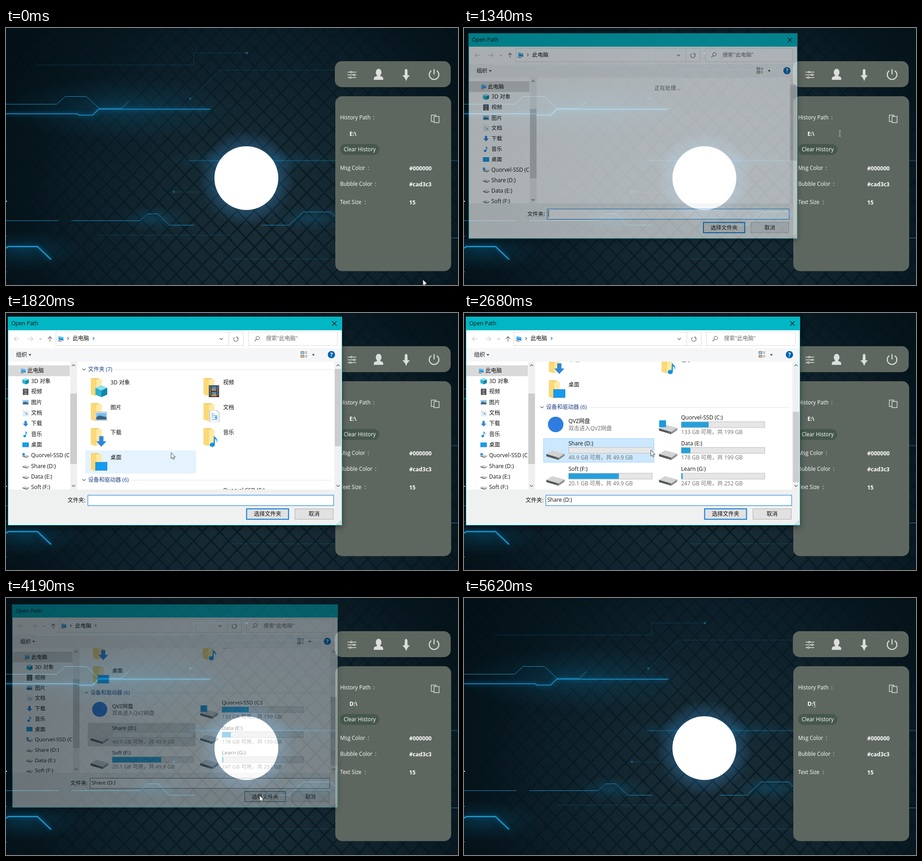
Write an HTML page that moves like this. It is 991 px wide and 565 px high and loops after 5.7 s.

```html
<!DOCTYPE html>
<html lang="zh-CN">
<head>
<meta charset="utf-8">
<title>Open Path</title>
<style>
html, body { margin: 0; width: 100%; height: 100%; overflow: hidden; background: #04121a; }
svg { display: block; }
#stage { width: 991px; height: 565px; }
text { font: 12px "Open Sans", "Noto Sans CJK SC", "Noto Sans CJK", sans-serif; fill: #111; white-space: pre; }
.panel text { fill: #fff; font-size: 11.7px; }
.panel .bold { font-weight: 700; font-size: 12.1px; }
.dim { fill: #6d6d6d; }
.head { fill: #1e3f86; }
.mid { text-anchor: middle; }
.line { fill: none; stroke: #555; stroke-width: 1.1; }
.faint { fill: none; stroke: #12698c; stroke-opacity: .4; }
.wire { fill: none; stroke: #1f8fc4; stroke-width: 1; }
.glow { fill: none; stroke: #0c7fc0; stroke-width: 7; filter: url(#blur5); opacity: .3; }
</style>
</head>
<body>
<svg id="stage" viewBox="0 0 991 565"></svg>
<script>
const LOOP = 5700, STEP = 80;
const ROW = 23.3, SCROLL = 160;
const BLUE = '#0078d7';

// ---------- drawing helpers ----------
const text = (x, cy, s, cls = '', more = '') => `<text x="${x}" y="${Math.round(cy + 4)}" class="${cls}" ${more}>${s}</text>`;
const rect = (x, y, w, h, fill, more = '') => `<rect x="${x}" y="${y}" width="${w}" height="${h}" fill="${fill}" ${more}/>`;
const frame = (x, y, w, h, stroke, fill = 'none', more = '') => rect(x + .5, y + .5, w - 1, h - 1, fill, `stroke="${stroke}" ${more}`);
const path = (d, cls = 'line', more = '') => `<path d="${d}" class="${cls}" ${more}/>`;
const use = (id, x, y, w, h = w) => `<use href="#${id}" x="${x}" y="${y}" width="${w}" height="${h}"/>`;
const chevron = (x, y, turn = 0, size = 3.5, more = '') =>
  path(`M${-size} ${-size / 2}L0 ${size / 2}L${size} ${-size / 2}`, 'line', `transform="translate(${x} ${y}) rotate(${turn})" ${more}`);
const triangle = (x, y) => `<path d="M${x - 3} ${y - 1.5}h6l-3 3.5z" fill="#333"/>`;
const radial = (id, color, alpha) =>
  `<radialGradient id="${id}"><stop stop-color="${color}" stop-opacity="${alpha}"/><stop offset=".5" stop-color="${color}" stop-opacity="${alpha * .4}"/><stop offset="1" stop-color="${color}" stop-opacity="0"/></radialGradient>`;
const halo = (id, x, y, rx, ry) => `<ellipse cx="${x}" cy="${y}" rx="${rx}" ry="${ry}" fill="url(#${id})"/>`;
const symbol = (id, w, h, body) => `<symbol id="${id}" viewBox="0 0 ${w} ${h}">${body}</symbol>`;

const defs = `<defs>
  <filter id="blur5" filterUnits="userSpaceOnUse" x="0" y="0" width="991" height="565"><feGaussianBlur stdDeviation="5"/></filter>
  <filter id="blur7" x="-10%" y="-10%" width="120%" height="120%"><feGaussianBlur stdDeviation="7"/></filter>
  <radialGradient id="base" gradientUnits="userSpaceOnUse" cx="540" cy="370" r="600">
    <stop stop-color="#142a34"/><stop offset=".5" stop-color="#091c26"/><stop offset="1" stop-color="#030f16"/></radialGradient>
  <radialGradient id="fade" gradientUnits="userSpaceOnUse" cx="560" cy="430" r="500">
    <stop stop-color="#fff"/><stop offset=".5" stop-color="#808080"/><stop offset="1" stop-color="#141414"/></radialGradient>
  ${radial('teal', '#0a6f9c', .3)}${radial('sky', '#3f9be8', 1)}
  <pattern id="mesh" width="3" height="3" patternUnits="userSpaceOnUse">${rect(0, 0, 1, 1, '#06141b')}</pattern>
  <pattern id="grid" width="27" height="27" patternUnits="userSpaceOnUse" patternTransform="translate(526 300) scale(1 1.04) rotate(45)">
    ${rect(0, 0, 27, 27, '#1b2e37')}${rect(0, 0, 27, 3.5, '#091a22')}${rect(0, 0, 3.5, 27, '#091a22')}</pattern>
  <mask id="gridMask">${rect(0, 0, 991, 565, 'url(#fade)')}</mask>
  <clipPath id="sideClip">${rect(5, 107, 135, 281)}</clipPath>
  <clipPath id="listClip">${rect(156, 107, 564, 281)}</clipPath>
  ${symbol('pc', 14, 14, '<path d="M2 2l10 2v7L2 9z" fill="#1f8fdc"/><path d="M2 2l10 2v3L2 6z" fill="#5cc0f5"/><path d="M1 10l8 2-2 1-6-1z" fill="#777"/>')}
  ${symbol('cube', 14, 14, '<path d="M7 0l7 3-7 3-7-3z" fill="#8be0ee"/><path d="M0 3l7 3v8l-7-3z" fill="#27b3cf"/><path d="M14 3L7 6v8l7-3z" fill="#1186a8"/>')}
  ${symbol('film', 14, 14, '<path d="M1 0h12v14H1z" fill="#333"/><path d="M4 1h6v5.5H4zM4 7.5h6V13H4z" fill="#3f83c9"/><path d="M4 5l3-2 3 3v.5H4zM4 12l4-3 2 2v2H4z" fill="#c78a45"/><path d="M2.5 1v12M11.5 1v12" stroke="#ddd" stroke-dasharray="1 1"/>')}
  ${symbol('picture', 14, 14, '<path d="M0 2h14v10H0z" fill="#eef3f7" stroke="#9aa" stroke-width=".5"/><path d="M1 3h12v8H1z" fill="#79bdec"/><path d="M1 8l4-2 8 2v3H1z" fill="#3a637f"/>')}
  ${symbol('doc', 14, 14, '<path d="M2 0h8l3 3v11H2z" fill="#fff" stroke="#9ab" stroke-width=".6"/><path d="M4 4h3M4 6h7M4 8h3M4 11h7" stroke="#4b93cc" stroke-width=".7"/><path d="M8 7h3v3H8z" fill="#5ea9dd"/>')}
  ${symbol('down', 14, 14, '<path d="M4.5 1h5v6H13l-6 6.500L1 7h3.500z" fill="#2f86dc"/>')}
  ${symbol('note', 14, 14, '<path d="M7 0c1 3 6 4 3 9 1-4-1-4-2-4.500V11a3 2.500 0 1 1-1.500-2z" fill="#1191e8"/>')}
  ${symbol('screen', 14, 14, '<path d="M0 2h14v10H0z" fill="#0f78c8"/><path d="M.5 2.500h13v9H.5z" fill="#159cf0"/>')}
  ${symbol('drive', 40, 22, '<path d="M0 9L13 1l27 7-13 9z" fill="#d2d3d4"/><path d="M0 9l27 8v5L0 14z" fill="#55585a"/><path d="M27 17l13-9v5l-13 9z" fill="#8d9092"/><path d="M21 17l3 1v1l-3-1z" fill="#6f6"/>')}
  ${symbol('folder', 26, 42, '<path d="M1 1h17l2 4h5v34H6z" fill="#f5cf68"/><path d="M12 4h13v35H12z" fill="#ffe9a6"/><path d="M1 1l12 5v35L1 37z" fill="#fbd978"/>')}
</defs>`;

// ---------- wallpaper ----------
const thin = ['M0 167.500H111L130 150.500H176L204 176.500H253L269 161', 'M0 423.500H115M143 423.500H294L310 408.500H333L359 433.500H413', 'M561 433.500H620L652 404.500H712L722 414M977 461.500H991'];
const beamLine = 'M0 188.500H156L160 191.500H190L203 178.500H448', cornerLine = 'M0 484L5 480.500H69L99 509';
const dot = (x, y) => `<circle cx="${x}" cy="${y}" r="2.5" fill="#125f80"/>`;
const wallpaper = `
  ${rect(0, 0, 991, 565, 'url(#base)')}
  <g mask="url(#gridMask)">${rect(0, 0, 991, 565, 'url(#grid)')}</g>
  ${rect(0, 0, 991, 565, 'url(#mesh)', 'opacity=".35"')}
  ${halo('teal', 250, 178, 260, 70)}${halo('teal', 40, 490, 130, 45)}${halo('teal', 540, 291, 200, 25)}
  ${halo('teal', 325, 420, 80, 28)}${halo('teal', 670, 418, 90, 28)}
  ${path('M67 81.500H411.500V55H528M404 155L470 92.500H722M368 360.500H434L450 345M205 455.500H500M490 507.500H722', 'faint')}
  ${dot(528, 55)}${dot(404, 155)}${dot(368, 360)}
  ${path('M400 291.500H722M976 291.500H991', 'wire', 'opacity=".35" style="stroke-width:2"')}
  ${[beamLine, cornerLine].map(d => path(d, 'glow')).join('')}
  ${thin.map(d => path(d, 'wire')).join('')}
  ${path(beamLine, 'wire', 'style="stroke-width:1.6;stroke:#1ca0de"')}
  ${path(cornerLine, 'wire', 'style="stroke-width:3"')}
  ${rect(0, 380, 2, 2, '#fff')}${rect(0, 457, 1, 2, '#9ab')}${rect(0, 535, 1, 2, '#9ab')}
  ${halo('sky', 527, 330, 105, 105)}
  <circle cx="527" cy="330" r="70" fill="#fff"/>`;

// ---------- settings panel ----------
const labels = [['History Path', 197, 805], ['Msg Color', 308, 793], ['Bubble Color', 343, 809], ['Text Size', 383, 786]];
const panel = `<g class="panel">
  ${rect(721, 73, 254, 57, '#5e675f', 'rx="15"')}${rect(722, 150, 254, 384.5, '#5e675f', 'rx="15"')}
  <g fill="none" stroke="#dcdfdc" stroke-width="1.400">
    <path d="M749 97H768M749 103H768M749 109H768"/>
    <g fill="#5e675f"><circle cx="757" cy="97" r="1.800"/><circle cx="763" cy="103" r="1.800"/><circle cx="755" cy="109" r="1.800"/></g>
    <path d="M932.500 191.500h10v14h-10z"/><path d="M938.500 194.500h11v13.500h-11z" fill="#5e675f"/>
    <path d="M932.500 94a10.500 10.500 0 1 0 12 0M938.500 90.500V102" stroke-width="2.300"/>
  </g>
  <g fill="#dcdfdc"><ellipse cx="817" cy="97.500" rx="6.300" ry="7.700"/><path d="M813.500 102h7v3.500l5 2q1.800 1.500 1.500 6.500h-20.500q-.3-5 1.500-6.500l5.500-2z"/>
    <path d="M874.500 92q2.700-4 5.500 0l.5 12h5l-5.500 6-2.500 6.500-3-6.500-5.500-6h5z"/></g>
  ${labels.map(([s, y, colon]) => text(732.5, y, s) + text(colon, y, ':')).join('')}
  <text id="drivePath" x="753" y="237" class="bold"></text>
  ${rect(732.5, 255, 86, 24, '#46584b', 'rx="12"')}${text(775.5, 267, 'Clear History', 'mid')}
  ${text(884, 308.5, '#000000', 'bold')}${text(884, 343.5, '#cad3c3', 'bold')}${text(884, 383.5, '15', 'bold')}
</g>`;

// ---------- dialog ----------
const places = [['3D 对象', 'cube'], ['视频', 'film'], ['图片', 'picture'], ['文档', 'doc'], ['下载', 'down'], ['音乐', 'note'], ['桌面', 'screen']];
const drives = [['Quorvel-SSD (C:)', '133 GB 可用，共 199 GB', 60], ['Share (D:)', '49.9 GB 可用，共 49.9 GB', 0], ['Data (E:)', '178 GB 可用，共 199 GB', 20],
  ['Soft (F:)', '20.1 GB 可用，共 49.9 GB', 110], ['Learn (G:)', '247 GB 可用，共 252 GB', 3]];

const sidebar = `<g clip-path="url(#sideClip)">
  ${rect(5, 115, 135, 24, '#d9d9d9')}${use('pc', 31, 120, 14)}${text(47, 127, '此电脑')}
  ${places.map(([s, icon], i) => use(icon, 36, 143 + i * ROW, 14) + text(55, 150 + i * ROW, s)).join('')}
  ${drives.slice(0, 4).map(([s], i) => use('drive', 36, 310.5 + i * ROW, 15, 8) + text(55, 313.4 + i * ROW, s)).join('')}
  ${rect(36, 308, 5, 5, '#1a9be0')}</g>
  ${rect(141, 107, 15, 281, '#f0f0f0')}${rect(141, 177, 14.5, 155, '#cdcdcd')}${chevron(148, 115, 180)}${chevron(148, 380)}`;

const section = (y, s, ruleX) => chevron(171, y) + text(180, y, s, 'head') + rect(ruleX, y, 714 - ruleX, 1, '#e4e4e4');
const placeTile = ([s, icon], i) => {
  const x = i % 2 ? 421 : 174, y = 137 + 55 * (i >> 1);
  return use('folder', x + 11, y + 5, 26, 42) + use(icon, x + 22, y + 22, 26) + text(x + 55, y + 16, s);
};
const driveTile = ([s, space, used], i) => {
  const x = i % 2 ? 174 : 421, y = 379.5 + 56.6 * ((i + 1) >> 1);
  return use('drive', x + 6, y + 25, 41, 22) + text(x + 55, y + 10.5, s) + frame(x + 55, y + 19, 184, 14, '#bcbcbc', '#e6e6e6')
    + rect(x + 55.5, y + 20, used, 12, '#26a0da') + text(x + 55, y + 42, space, 'dim');
};
const list = `<g clip-path="url(#listClip)"><g id="list">
  ${rect(174, 302, 243, 51, '#e5f3ff', 'id="hoverDesk"')}
  ${frame(174, 435.5, 243, 53, '#99d1ff', '#cce8ff', 'id="share"')}
  ${section(124, '文件夹 (7)', 239)}${places.map(placeTile).join('')}
  ${section(367, '设备和驱动器 (6)', 274)}
  <circle cx="201" cy="405" r="17" fill="#2f7de0"/>${text(229, 397.5, 'QVZ网盘')}${text(229, 413.5, '双击进入QVZ网盘', 'dim')}
  ${drives.map(driveTile).join('')}${rect(428, 396, 15, 15, '#1a9be0')}</g></g>`;

const dialog = `<g id="dialog">
  ${rect(4, 12, 733, 459, '#000', 'filter="url(#blur7)" opacity=".45"')}
  ${frame(4, 8, 733, 459, '#00b7c3', '#eff1f1')}${rect(4, 8, 733, 30, '#00b7c3')}
  ${text(11.5, 23, 'Open Path')}${path('M715 18l10 10M725 18l-10 10', 'line', 'id="close" style="stroke:#111"')}
  ${rect(5, 38, 731, 39, '#fff')}${rect(5, 77, 731, 30, '#f5f6f7')}${rect(5, 107, 731, 281, '#fff')}
  ${path('M30 57H18m5-5l-5 5 5 5M47 57h12m-5-5l5 5-5 5', 'line', 'style="stroke:#c6c6c6"')}${chevron(76, 57, 0, 2.5, 'opacity=".5"')}
  ${path('M96.500 63V52m-4.500 4.500l4.500-4.500 4.500 4.500')}
  ${frame(109, 41, 412, 31, '#d9d9d9', '#fff')}${rect(488, 42, 1, 29, '#d9d9d9')}${use('pc', 113, 49, 15)}
  ${chevron(136, 56, -90, 3)}${text(146, 56, '此电脑')}${chevron(472, 57)}
  ${path('M501 53.500a5 5 0 1 0 6 0M508 57v-4h-4')}
  ${frame(531, 41, 196, 31, '#d9d9d9', '#fff')}<circle cx="552" cy="55" r="3.800" class="line"/>${path('M549 58l-4 4')}${text(570, 56, '搜索"此电脑"', 'dim')}
  ${text(22, 92, '组织')}${triangle(52.5, 92)}${triangle(674, 92)}
  ${frame(646, 84, 8, 6, '#777', '#9cc4e0')}${frame(646, 92, 8, 6, '#777', '#d6b48a')}${path('M656 85.500h4m-4 3h4m-4 5h4m-4 3h4')}
  <circle cx="713.500" cy="91.500" r="8" fill="#0063b1"/>${text(713.5, 91.5, '?', 'mid', 'style="fill:#fff;font-weight:700"')}
  ${sidebar}
  ${rect(720, 107, 15, 281, '#f0f0f0')}<rect id="thumb" x="721" width="14" fill="#cdcdcd"/>
  ${text(447, 130, '正在处理...', 'mid dim', 'id="loading"')}
  <g id="loaded">${chevron(192, 56, -90, 3, 'style="stroke:#06a"')}${chevron(728, 115, 180)}${chevron(728, 380)}${list}</g>
  ${text(135, 412, '文件夹:')}${frame(179, 400, 540, 24, BLUE, '#fff', 'id="input"')}
  ${rect(182, 403, 1, 15, '#000', 'id="caret"')}${text(182.5, 411, 'Share (D:)', '', 'id="typed"')}
  <rect id="choose" x="527.500" y="430.500" width="92" height="23"/>${text(573.5, 442, '选择文件夹', 'mid')}
  ${frame(633, 430, 85, 24, '#adadad', '#e1e1e1')}${text(675.5, 442, '取消', 'mid')}
  <path d="M733 457v8M729.500 460.500v5M726 464v2" stroke="#aaa" stroke-width="2" stroke-dasharray="2 1.500"/>
</g>`;

const pointer = `<g id="pointer">
  <path id="arrow" d="M0 0V13.200L3 10.500L5 15L7.200 14L5.200 9.700H9.500Z" fill="#fff" stroke="#111" stroke-width=".8"/>
  <path id="beam" d="M-2.500 -6H-.5L0 -5.500L.5 -6H2.500M0 -5.500V5.500M-2.500 6H-.5L0 5.500L.5 6H2.500" fill="none"/>
  <g id="busy" fill="none" stroke-width="3.200"><circle r="6.500" stroke="#1583e6"/><path d="M0 -6.500A6.500 6.500 0 0 1 6.500 0" stroke="#5cc8ff"/></g>
</g>`;

const stage = document.getElementById('stage');
stage.innerHTML = defs + wallpaper + panel + dialog + pointer;
const el = Object.fromEntries([...stage.querySelectorAll('[id]')].map(n => [n.id, n]));

// ---------- motion ----------
// Screen refreshes: [first time, count], STEP apart.
const bursts = [[0, 1], [70, 8], [710, 1], [860, 8], [1500, 5], [1980, 2], [2370, 1], [2520, 5], [2990, 8], [3630, 8], [4260, 8], [4900, 8], [5540, 2]];
const ticks = bursts.flatMap(([start, n]) => Array.from({ length: n }, (_, i) => start + i * STEP));

// Pointer stops: time, x, y.
const route = [[0, 914, 553], [70, 914, 546], [310, 922, 390], [550, 933, 225], [630, 935, 208], [710, 935, 205], [859, 935, 205], [860, 939, 201], [1180, 939, 201],
  [1260, 905, 212], [1340, 824, 232], [1420, 743, 246], [1580, 480, 288], [1740, 374, 306], [1820, 362, 307], [2520, 362, 307], [2840, 457, 296],
  [2990, 460, 302], [3230, 486, 372], [3390, 500, 411], [3550, 556, 437], [3630, 556, 434], [4260, 556, 434], [4420, 610, 390], [4660, 730, 275], [4820, 764, 243],
  [4980, 742, 236], [5140, 768, 231], [5300, 740, 234], [5460, 756, 231], [5620, 769, 234]];
const fadeKeys = [[1180, 0], [1260, .15], [1340, .66], [1420, .95], [1500, 1], [4030, 1], [4110, .85], [4190, .43], [4260, .1], [4340, 0]];
const zoomKeys = [[1260, .965], [1340, .984], [1420, .997], [1500, 1], [4030, 1], [4110, .991], [4190, .974], [4260, .962]];
const scrollKeys = [[1820, 0], [1980, .5], [2060, 1]];

function sample(keys, t, i = 1) {
  const next = keys.findIndex(k => k[0] > t);
  if (next < 0) return keys[keys.length - 1][i];
  if (next === 0) return keys[0][i];
  const a = keys[next - 1], b = keys[next];
  return a[i] + (b[i] - a[i]) * (t - a[0]) / (b[0] - a[0]);
}
const show = (node, on) => node.setAttribute('display', on ? 'inline' : 'none');
const set = (node, attrs) => Object.entries(attrs).forEach(([k, v]) => node.setAttribute(k, v));

function draw(t) {
  const x = sample(route, t, 1), y = sample(route, t, 2);
  const opacity = sample(fadeKeys, t), zoom = sample(zoomKeys, t), scroll = sample(scrollKeys, t);
  const closing = t >= 4110, loaded = t >= 1500, picked = t >= 2520, over = t >= 3550;

  show(el.dialog, opacity > 0);
  set(el.dialog, { opacity, transform: `translate(370.5 237.5) scale(${zoom}) translate(-370.5 -237.5)` });
  show(el.close, !closing);
  show(el.loading, !loaded);
  show(el.loaded, loaded);
  set(el.list, { transform: `translate(0 ${-SCROLL * scroll})` });
  set(el.thumb, { y: 123 + 94 * scroll, height: 170 - 15 * scroll });
  show(el.hoverDesk, t >= 1660 && t < 1980);
  show(el.share, t >= 2060);
  set(el.share, { fill: closing ? '#d9d9d9' : picked ? '#cce8ff' : '#e5f3ff', stroke: closing ? '#d9d9d9' : picked ? '#99d1ff' : '#e5f3ff' });
  show(el.typed, picked);
  show(el.caret, t < 1820 || (t >= 2370 && !picked));
  set(el.input, { stroke: t >= 2990 ? '#5c5c5c' : BLUE });
  set(el.choose, { fill: over && !closing ? '#e5f1fb' : '#e1e1e1', stroke: closing ? '#123c5c' : BLUE, 'stroke-width': over ? 1 : 2 });
  el.drivePath.textContent = t >= 4190 ? 'D:\\' : 'E:\\';

  const busy = t >= 860 && t <= 1180;
  const inField = x > 737 && y > 222 && y < 242 && t > 1260;
  const inInput = opacity === 1 && y > 400 && y < 424;
  const beam = inField || inInput;
  set(el.pointer, { transform: `translate(${x} ${y})` });
  show(el.busy, busy);
  show(el.beam, beam);
  show(el.arrow, !busy && !beam);
  set(el.busy, { transform: `rotate(${(t - 860) * .45})` });
  set(el.beam, { stroke: inInput ? '#000' : '#c4c8c4' });
}

let last = -1;
function loop(now) {
  const time = now % LOOP;
  const tick = ticks.filter(k => k <= time).pop();
  if (tick !== last) draw(last = tick);
  requestAnimationFrame(loop);
}
draw(0);
requestAnimationFrame(loop);
</script>
</body>
</html>
```
